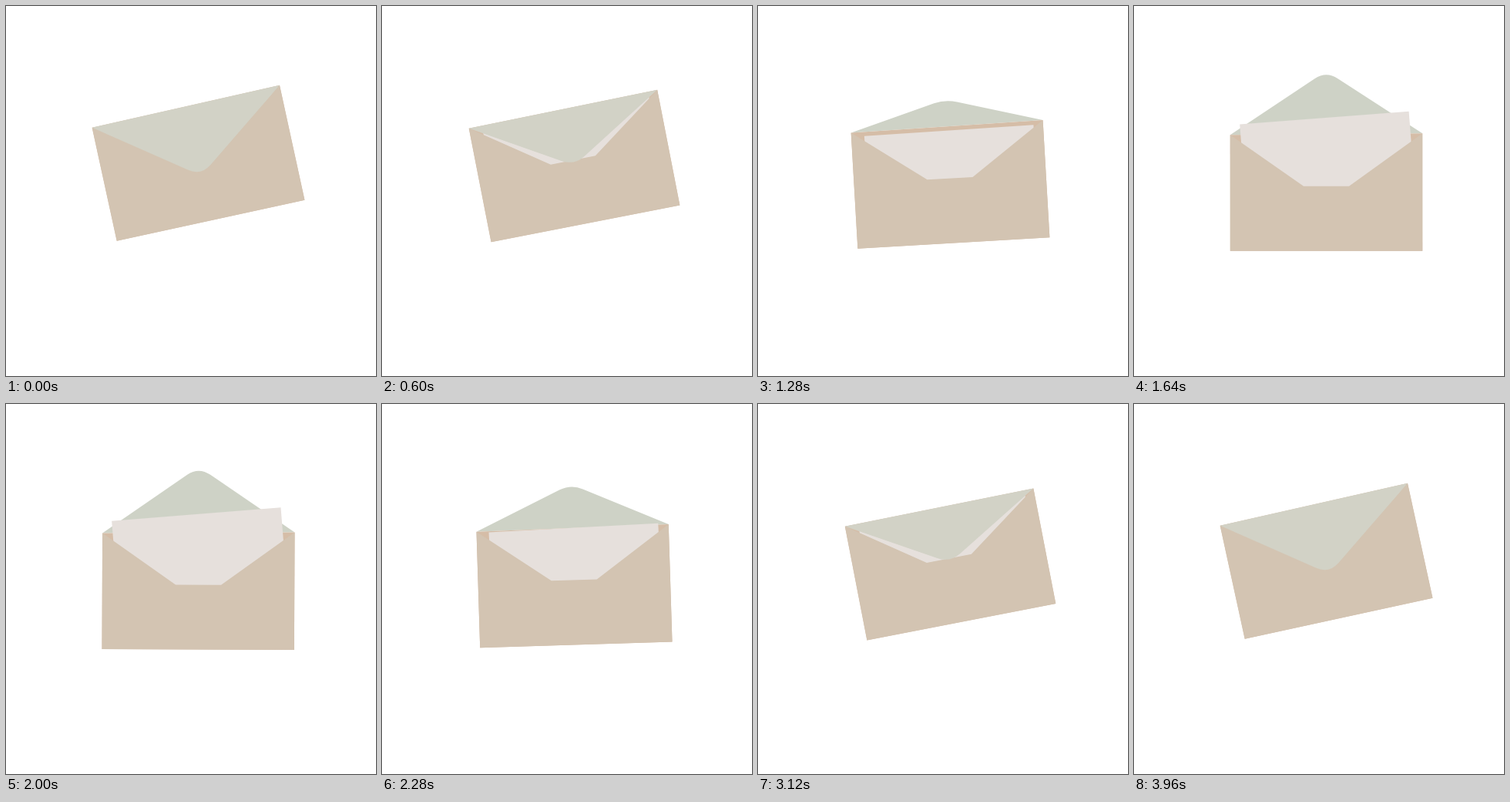
An HTML page for the animation above (4 s loop, 480 by 480 pixels).

```html
<!DOCTYPE html>
<html lang="en">
<head>
<meta charset="utf-8">
<title>Envelope</title>
<style>
  html, body { margin: 0; width: 100%; height: 100%; overflow: hidden; background: #fff; }
  svg { display: block; width: 100%; height: 100%; }
</style>
</head>
<body>
<svg viewBox="0 0 480 480">
  <g id="envelope">
    <path id="openFlap" fill="#ced2c6"/>
    <path fill="#d5bda7" d="M-124.7-75L124.7-77V75.5H-124.7Z"/>
    <rect id="letter" x="-110" y="-70.3" width="220" height="140" fill="#e6e0dc"/>
    <path fill="#d3c4b2" d="M-124.7-75L-29.5-8.5H29.5L124.7-77V75.5H-124.7Z"/>
    <path id="closedFlap" fill="#d2d2c6"/>
  </g>
</svg>
<script>
  const LOOP = 4000;
  const PEAK = 1840;
  const [envelope, letter, openFlap, closedFlap] =
    ['envelope', 'letter', 'openFlap', 'closedFlap'].map(id => document.getElementById(id));

  const clamp = (v, lo, hi) => Math.min(hi, Math.max(lo, v));
  const sineEase = u => (1 - Math.cos(Math.PI * u)) / 2;

  // fold: 1 lies over the front, -1 stands fully open
  function flapPath(fold) {
    const y = depth => -76 + depth * fold;
    return `M-124.7-75L-15 ${y(81)}Q0 ${y(92)} 15 ${y(81)}L124.7-77Z`;
  }

  function draw(t) {
    const open = sineEase(clamp(Math.min((t - 280) / 1603, (3470 - t) / 1670), 0, 0.93));
    const rise = sineEase(clamp(1 - Math.abs(t - PEAK) / 600, 0, 1));
    const fold = 1 - 2 * open;

    envelope.setAttribute('transform',
      `translate(249.5 ${204.5 + 40 * open}) rotate(${-12.3 + 13 * open})`);
    letter.setAttribute('transform',
      `translate(2.8 ${-36 * rise}) rotate(${-0.4 - 5.3 * rise})`);
    openFlap.setAttribute('d', fold < 0 ? flapPath(fold) : '');
    closedFlap.setAttribute('d', fold < 0 ? '' : flapPath(fold));
  }

  const start = performance.now();
  function tick() {
    draw((performance.now() - start) % LOOP);
    requestAnimationFrame(tick);
  }
  tick();
</script>
</body>
</html>
```
